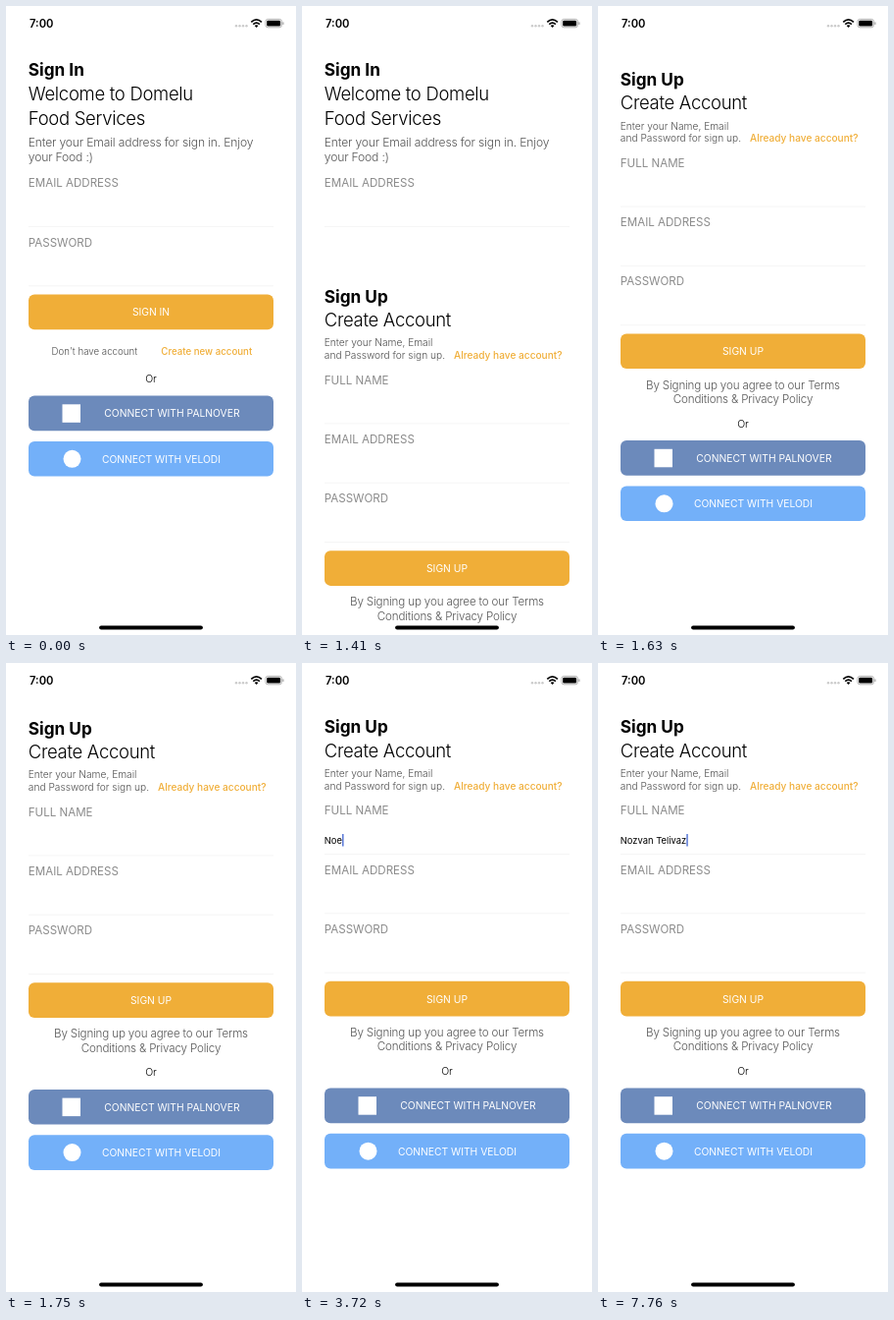
An HTML page for the animation above (8000 ms loop, 296x640 px).

```html
<!DOCTYPE html>
<html lang="en">
<head>
<meta charset="utf-8">
<title>Sign up</title>
<style>
  html, body { margin: 0; width: 100%; height: 100%; overflow: hidden; background: #fff; }
  svg { display: block; width: 296px; height: 640px; }
  text { font-family: Inter, Roboto, sans-serif; white-space: pre; }
</style>
</head>
<body>
<svg id="stage" viewBox="0 0 296 640"></svg>
<script>
const LOOP = 8000;
const LEFT = 22.8, CENTER = 148;
const YELLOW = "#f0ae38", BLUE = "#6c8abb", SKY = "#73b0f9";

// y is the middle of the capital letters
function text(content, x, y, size, { weight = 300, fill = "#000", spacing = 0, anchor = "start", id = "" } = {}) {
  return `<text id="${id}" x="${x}" y="${y + size * 0.364}" font-size="${size}" font-weight="${weight}"
    fill="${fill}" letter-spacing="${spacing}" text-anchor="${anchor}">${content}</text>`;
}

const title = (content, y) => text(content, LEFT, y, 17.2, { weight: 700 });
const heading = (content, y) => text(content, LEFT, y, 18.5, { spacing: -0.3 });
const note = (content, x, y, size, anchor) =>
  text(content, x, y, size, { fill: "#555", spacing: -0.15, anchor });
const small = (content, x, y, size) => text(content, x, y, size, { fill: "#505050" });
const link = (content, x, y, size, id) => text(content, x, y, size, { weight: 500, fill: YELLOW, id });

const field = (label, y) =>
  text(label, LEFT, y, 11.55, { weight: 400, fill: "#8a8a8a" }) +
  `<rect x="23" y="${y + 44}" width="250" height="1" fill="#f5f5f5"/>`;

const button = (label, y, fill, x = CENTER, anchor = "middle") =>
  `<rect x="23" y="${y}" width="250" height="35.7" rx="6" fill="${fill}"/>` +
  text(label, x, y + 18, 10.3, { weight: 400, fill: "#fff", anchor });

const social = y =>
  text("Or", CENTER, y, 10.5, { anchor: "middle" }) +
  button("CONNECT WITH PALNOVER", y + 17.3, BLUE, 100.3, "start") +
  `<rect x="57.5" y="${y + 26}" width="18.5" height="18.5" fill="#fff"/>` +
  button("CONNECT WITH VELODI", y + 63.6, SKY, 97.9, "start") +
  `<circle cx="67.5" cy="${y + 81.5}" r="9" fill="#fff"/>`;

const signIn =
  title("Sign In", 65) +
  heading("Welcome to Domelu", 89.5) +
  heading("Food Services", 114) +
  note("Enter your Email address for sign in. Enjoy", LEFT, 139, 12.1) +
  note("your Food :)", LEFT, 154, 12.1) +
  field("EMAIL ADDRESS", 180) +
  field("PASSWORD", 240.3) +
  button("SIGN IN", 293.5, YELLOW) +
  small("Don't have account", 46.6, 351, 9.7) +
  link("Create new account", 158.3, 351.2, 9.7, "create") +
  social(379.3);

const signUp =
  `<rect width="296" height="640" fill="#fff"/>` +
  title("Sign Up", 65) +
  heading("Create Account", 89) +
  small("Enter your Name, Email", LEFT, 112.3, 10.2) +
  small("and Password for sign up.", LEFT, 124.8, 10.2) +
  link("Already have account?", 155, 125.2, 10.15) +
  field("FULL NAME", 150) +
  text("", LEFT, 180.6, 9.4, { weight: 400, id: "typed" }) +
  `<rect id="caret" y="174" width="1.3" height="12.5" fill="#3f63d0"/>` +
  field("EMAIL ADDRESS", 210.3) +
  field("PASSWORD", 270.6) +
  button("SIGN UP", 323.8, YELLOW) +
  note("By Signing up you agree to our Terms", CENTER, 375.7, 11.6, "middle") +
  note("Conditions &amp; Privacy Policy", CENTER, 390, 11.6, "middle") +
  social(415.2);

const statusBar =
  text("7:00", 24, 17.8, 11.2, { weight: 600 }) +
  [235, 238.5, 242, 245.5].map(x => `<circle cx="${x}" cy="20.2" r="1.2" fill="#cacaca"/>`).join("") +
  `<g fill="none" stroke="#000" stroke-width="1.7">
    <path d="M250.3 16.3Q255.6 11.6 260.9 16.3M252.3 18.6Q255.6 15.8 258.9 18.6"/>
  </g>
  <path d="M253.7 20Q255.6 18.6 257.5 20L255.6 22Z"/>
  <rect x="264.9" y="13.4" width="16.6" height="8.4" rx="2.4" fill="none" stroke="#a0a0a0" stroke-width=".8"/>
  <rect x="266.2" y="14.7" width="14" height="5.8" rx="1.3"/>
  <rect x="282.4" y="16.2" width="1.1" height="2.8" rx=".5" fill="#a0a0a0"/>`;

const homeBar = `<rect x="95.1" y="630.5" width="105.8" height="4" rx="2"/>`;

const $ = id => document.getElementById(id);
$("stage").innerHTML = signIn + `<g id="sheet">${signUp}</g>` + statusBar + homeBar;

const SHEET_STEPS = [1410, 1520, 1630, 1750];
const KEYS = [
  [3410, "N"], [3410, "o"], [3720, "e"], [4570, "back"], [4730, "z"], [5000, "v"],
  [5620, "a"], [5970, "n"], [6270, " "], [6600, "T"], [6770, "e"], [6980, "l"],
  [7170, "i"], [7470, "v"], [7640, "a"], [7760, "z"]
];

// Critically damped spring, shown at a low frame rate
function sheetOffset(t) {
  if (t < SHEET_STEPS[0]) return 640;
  if (t >= 2510) return 0;
  const shown = SHEET_STEPS.filter(step => step <= t).pop();
  const phase = 0.01815 * (shown - 1290);
  return 640 * (1 + phase) * Math.exp(-phase);
}

const typedAt = t => KEYS
  .filter(([time]) => time <= t)
  .reduce((word, [, key]) => key === "back" ? word.slice(0, -1) : word + key, "");

function caretOpacity(t) {
  if (t < 3100 || (t >= 4340 && t < 4570)) return 0;
  return t < 3220 ? 0.5 : 1;
}

function draw(t) {
  $("create").setAttribute("opacity", t >= 1190 ? 0.4 : 1);
  $("sheet").setAttribute("transform", `translate(0 ${sheetOffset(t)})`);
  const typed = $("typed"), word = typedAt(t);
  if (typed.textContent !== word) typed.textContent = word;
  $("caret").setAttribute("x", LEFT + 0.2 + (word ? typed.getComputedTextLength() : 0));
  $("caret").setAttribute("opacity", caretOpacity(t));
}

const start = performance.now();
function tick() {
  draw((performance.now() - start) % LOOP);
  requestAnimationFrame(tick);
}
tick();
</script>
</body>
</html>
```
